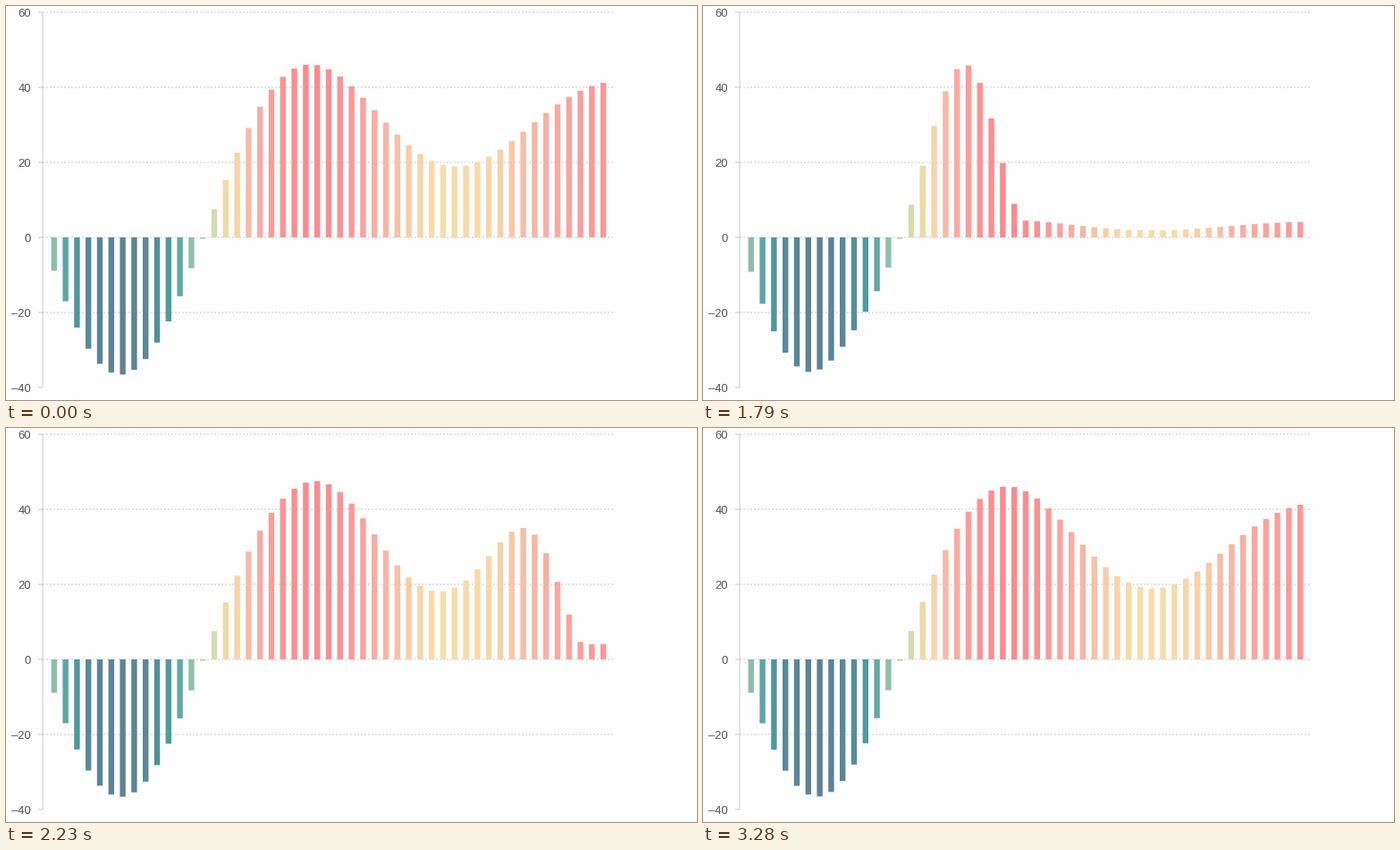
A matplotlib script that plays this animation: 773 by 441 pixels, repeating every 3.87 s.

```python
import numpy as np
import matplotlib.pyplot as plt
from matplotlib.animation import FuncAnimation
from matplotlib.collections import PolyCollection
from matplotlib.colors import to_rgb

W, H, DPI = 773, 441, 64
PX = 72 / DPI                  # points per pixel
INTERVAL, LOOP = 10, 3870      # ms
LEFT, RIGHT, ZERO, UNIT = 41, 680, 259, 4.2
BAND, BAR = 12.8, 6.4
BACK = "#fefefe"

# Screen updates during the replay and the animation clock behind them
UPDATES = [1350, 1500, 1650, 1790, 1940, 2080, 2230,
           2380, 2530, 2680, 2830, 2980, 3130, 3280]
CLOCK_START, CLOCK_STEP = 20.5, 150.4
DELAY, DURATION, REST = 20, 1000, 0.1

STOPS = [(-36.5, "#5f8297"), (-29.6, "#568b9b"), (-22.5, "#4f9a9f"),
         (-16, "#60a8a5"), (-8.5, "#8fbfab"), (0, "#b5d0b0"),
         (7.5, "#d4dcb1"), (15.3, "#eedaa6"), (19.5, "#f8dba8"),
         (24, "#f7cfa9"), (29, "#f6bba6"), (35, "#f9a9a2"),
         (40, "#fb9a99"), (46, "#fb8a8d")]

index = np.arange(1, 50)
values = (np.sin(index / 5) * (index / 5 - 10) + index / 6) * 5
centers = LEFT + BAND * index


def bar_colors(vals):
    at = [s[0] for s in STOPS]
    rgb = np.array([to_rgb(s[1]) for s in STOPS])
    return np.column_stack([np.interp(vals, at, rgb[:, c]) for c in range(3)])


def elastic_out(k):
    wave = 2.0 ** (-10 * k) * np.sin((k - 0.075) * 2 * np.pi / 0.3)
    return np.where(k <= 0, 0, np.where(k >= 1, 1, 1 + wave))


def heights(t):
    step = np.searchsorted(UPDATES, t, side="right") - 1
    if step < 0:
        return values
    clock = CLOCK_START + CLOCK_STEP * step
    k = (clock - DELAY * (index - 1)) / DURATION
    return values * (REST + (1 - REST) * elastic_out(k))


def bar_shapes(vals):
    x0, x1 = centers - BAR / 2, centers + BAR / 2
    base = np.full_like(vals, ZERO)
    tip = ZERO - vals * UNIT
    xs = np.stack([x0, x1, x1, x0], axis=1)
    ys = np.stack([base, base, tip, tip], axis=1)
    return np.stack([xs, ys], axis=2)


fig = plt.figure(figsize=(W / DPI, H / DPI), dpi=DPI, facecolor=BACK)
ax = fig.add_axes([0, 0, 1, 1])
ax.set_xlim(0, W)
ax.set_ylim(H, 0)
ax.axis("off")


def line(xs, ys, color, style="-"):
    ax.plot(xs, ys, color=color, lw=PX, ls=style, snap=False,
            solid_capstyle="butt", dash_capstyle="butt", zorder=1)


for v in range(-40, 61, 20):
    y = ZERO - v * UNIT
    if v > -40:
        line([LEFT, RIGHT], [y, y], "#cccccc", (0, (2, 2)))
    line([LEFT - 5, LEFT], [y, y], "#cccccc")
    ax.text(28, y + 4.6, str(v).replace("-", "\u2013"), ha="right",
            va="baseline", family="Liberation Sans", size=13 * PX,
            color="#555555")
line([LEFT, LEFT], [7, 427], "#cccccc")

bars = PolyCollection(bar_shapes(values), facecolors=bar_colors(values),
                      edgecolors="none", linewidths=0, zorder=2)
bars.set_snap(False)
ax.add_collection(bars, autolim=False)


def draw(i):
    bars.set_verts(bar_shapes(heights(i * INTERVAL)))
    return [bars]


anim = FuncAnimation(fig, draw, frames=LOOP // INTERVAL, interval=INTERVAL,
                     repeat=True, repeat_delay=0, blit=False)
plt.show()
```
